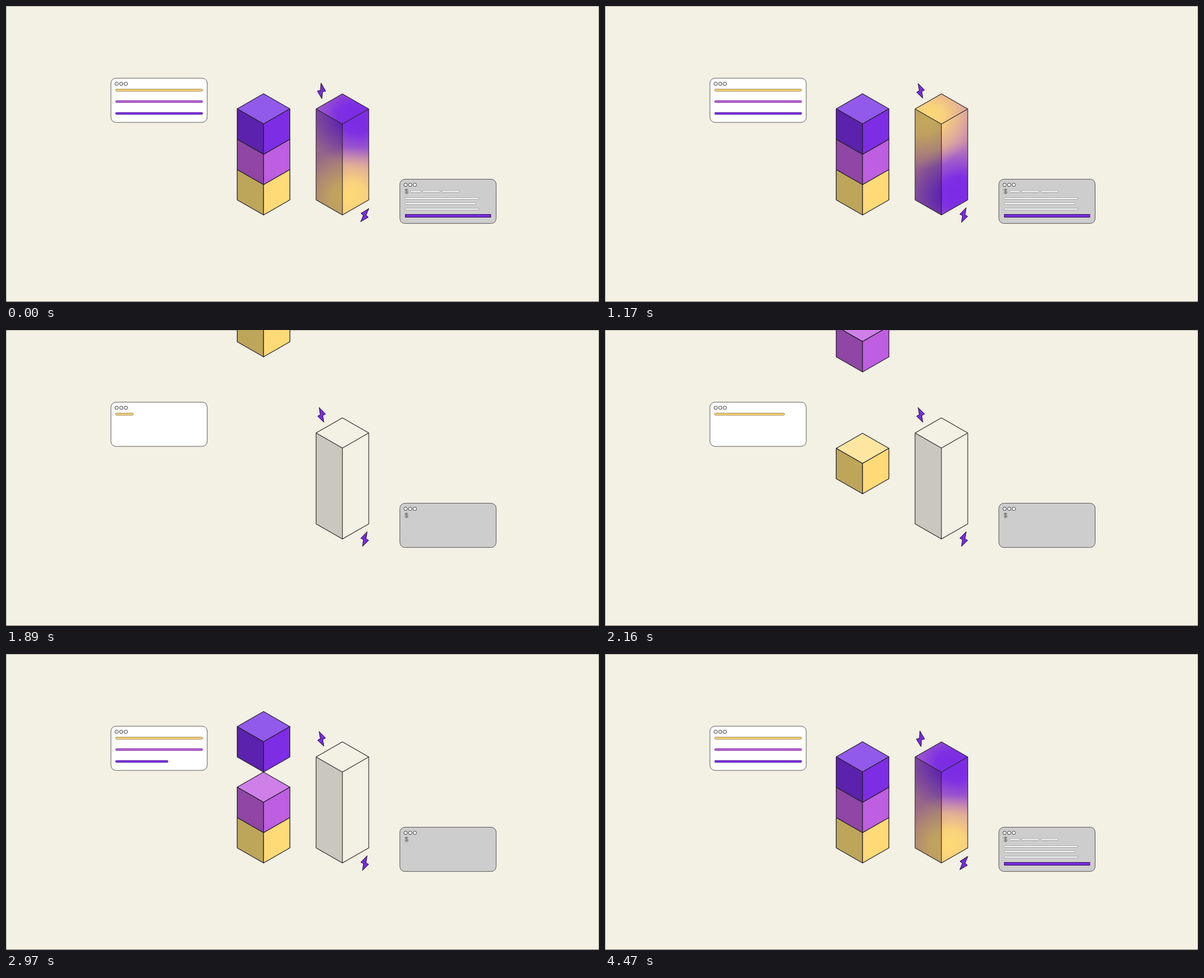
Recreate the animation shown at these times as an HTML page. Size 1058 by 529 pixels, loop 4500 ms.

```html
<!DOCTYPE html>
<html lang="en">
<head>
<meta charset="utf-8">
<title>Stacking blocks</title>
<style>
html, body { margin: 0; width: 100%; height: 100%; overflow: hidden; background: #f3f0e4; }
svg { display: block; width: 100vw; height: 100vh; }
</style>
</head>
<body>
<svg id="stage" viewBox="0 0 1058 529">
  <defs>
    <radialGradient id="glowPurple">
      <stop offset="0" stop-color="#7a2be5"/>
      <stop offset=".3" stop-color="#7a2be5" stop-opacity=".95"/>
      <stop offset=".65" stop-color="#7d30e2" stop-opacity=".5"/>
      <stop offset="1" stop-color="#8a40dc" stop-opacity="0"/>
    </radialGradient>
    <radialGradient id="glowYellow">
      <stop offset="0" stop-color="#ffda76"/>
      <stop offset=".3" stop-color="#ffda76" stop-opacity=".9"/>
      <stop offset=".65" stop-color="#fcd47c" stop-opacity=".5"/>
      <stop offset="1" stop-color="#f0c090" stop-opacity="0"/>
    </radialGradient>
    <clipPath id="prismClip"><path d="M600.2 157l47 27v162.500l-47 27l-47-27v-162.500z"/></clipPath>
  </defs>
  <rect width="1058" height="529" fill="#f3f0e4"/>
  <rect width="1058" height="528.500" fill="none" stroke="#55544f" stroke-width=".9"/>
</svg>
<script>
const LOOP = 4500, FALL_START = 1800, STEP = 450, TRAVEL = 408;
const stage = document.getElementById('stage');

function add(parent, tag, attrs = {}) {
  const el = document.createElementNS('http://www.w3.org/2000/svg', tag);
  for (const key in attrs) el.setAttribute(key, attrs[key]);
  parent.appendChild(el);
  return el;
}
const progress = (t, from, to) => Math.min(1, Math.max(0, (t - from) / (to - from)));

// Piecewise linear value over [time, value] pairs.
function track(keys, t) {
  let i = 1;
  while (i < keys.length - 1 && t > keys[i][0]) i++;
  const [t0, v0] = keys[i - 1], [t1, v1] = keys[i];
  return v0 + (v1 - v0) * progress(t, t0, t1);
}

function panel(x, y, fill) {
  add(stage, 'rect', { x, y, width: 171.8, height: 79, rx: 9, fill, stroke: '#333', 'stroke-width': .8 });
  for (let i = 0; i < 3; i++)
    add(stage, 'circle', { cx: x + 10.3 + i * 8.2, cy: y + 10, r: 3, fill: '#fff', stroke: '#222', 'stroke-width': .9 });
}

function bar(parent, x, cy, length, height, style) {
  const el = add(parent, 'rect', { x, y: cy - height / 2, height, 'stroke-width': .8, ...style });
  return { el, length };
}
function setBar({ el, length }, p) {
  el.setAttribute('width', length * p);
  el.setAttribute('visibility', p > 0 ? 'visible' : 'hidden');
}

// Editor panel
panel(187.2, 129, '#fff');
const editor = add(stage, 'g');
const codeBars = [['#fdd67a', '#7d6a35', 150.4], ['#be5ee0', '#6b2f80', 170.8], ['#7a2be5', '#42157f', 192]]
  .map(([fill, stroke, y]) => bar(editor, 195.6, y, 155.4, 3.6, { rx: 1.8, fill, stroke }));

// Terminal panel
panel(702.7, 309.6, '#cdcdcd');
add(stage, 'text', {
  x: 711.6, y: 335.4, 'font-size': 11, 'font-family': "'Liberation Sans', Arial, sans-serif",
  fill: '#fff', stroke: '#555', 'stroke-width': .6
}).textContent = '$';
const terminal = add(stage, 'g');
const outputBars = [[722, 331.3, 18], [743.3, 331.3, 31], [778, 331.3, 30.6],
  [712.2, 344, 131.6], [712.2, 353, 126.4], [712.2, 363, 131.6]]
  .map(([x, y, w]) => bar(terminal, x, y, w, 2.9, { rx: .8, fill: '#fff', stroke: '#777', 'stroke-width': .6 }));
const loadBar = bar(terminal, 712.5, 375, 152.4, 5, { fill: '#7a2be0', stroke: '#2b1250', 'stroke-width': 1 });

// Cubes, bottom one first
function cube(y, top, left, right) {
  const g = add(stage, 'g', { stroke: '#2a2030', 'stroke-width': 1.3, 'stroke-linejoin': 'round' });
  const face = (d, fill) => add(g, 'path', { d: `M459.500 ${y + 54}${d}z`, fill });
  face('l-47-27l47-27l47 27', top);
  face('l-47-27v54.300l47 27', left);
  face('l47-27v54.300l-47 27', right);
  return g;
}
const cubes = [
  cube(265.2, '#ffe6a0', '#bda65a', '#ffda76'),
  cube(211, '#cf80e8', '#8f46a5', '#be5ee0'),
  cube(156.8, '#925aeb', '#5b22ad', '#7d2de4')
];

// Prism
const LEFT_FACE = 'M553.200 184l47 27v162.500l-47-27z';
const prism = add(stage, 'g', { 'clip-path': 'url(#prismClip)' });
add(prism, 'rect', { x: 550, y: 150, width: 100, height: 230, fill: '#c385b4' });
const purpleGlow = add(prism, 'ellipse', { fill: 'url(#glowPurple)' });
const yellowGlow = add(prism, 'ellipse', { fill: 'url(#glowYellow)' });
add(prism, 'path', { d: LEFT_FACE, fill: '#000', opacity: .08 });
add(stage, 'path', { d: LEFT_FACE, fill: '#000', opacity: .17 });
add(stage, 'path', {
  d: 'M600.200 157l47 27v162.500l-47 27l-47-27v-162.500zM553.200 184l47 27l47-27M600.200 211v162.500',
  fill: 'none', stroke: '#2a2528', 'stroke-width': 1.1, 'stroke-linejoin': 'round'
});

function placeGlow(el, degrees, side) {
  const a = degrees * Math.PI / 180;
  const dx = -side * 52 * Math.sin(a), dy = side * 75 * Math.cos(a);
  el.setAttribute('rx', 108);
  el.setAttribute('ry', 1.2 * Math.hypot(dx, dy));
  el.setAttribute('transform', `translate(${600.2 + dx} ${268 + dy}) rotate(${degrees})`);
}
const YELLOW_TURN = [[3150, -28], [3690, -22], [4500, -13], [5070, 82], [6300, 220]];
const PURPLE_TURN = [[3150, 0], [3690, 8], [4500, 26], [5070, 96], [6300, 205]];

// Bolts
const bolts = [[563, 151.7, 1], [640, 373.6, -1]].map(([x, y, flip]) => {
  const el = add(stage, 'path', {
    d: [[-4.3, -13.2], [7, -1.5], [2.2, 1.1], [4, 13.2], [-7, 2.3], [-2.3, -.4]]
      .map(([px, py], i) => `${i ? 'L' : 'M'}${px * flip} ${py}`).join('') + 'z',
    fill: '#7a2be0', stroke: '#1d1033', 'stroke-width': 1, 'stroke-linejoin': 'round'
  });
  return { el, x, y };
});

function render(t) {
  const clearing = t < FALL_START;
  const fade = clearing ? 1 - progress(t, 1470, FALL_START) : 1;
  const barFade = clearing ? 1 - progress(t, 1380, 1700) : 1;

  cubes.forEach((g, i) => {
    const land = FALL_START + STEP * (i + 1);
    const lift = clearing ? 0 : TRAVEL * (1 - progress(t, FALL_START, land));
    g.setAttribute('transform', `translate(0 ${-lift})`);
    g.setAttribute('opacity', fade);
    setBar(codeBars[i], clearing ? 1 : progress(t, land - STEP, land));
  });
  editor.setAttribute('opacity', barFade);
  terminal.setAttribute('opacity', barFade);
  outputBars.forEach((b, i) => {
    const start = 3150 + i * 90;
    setBar(b, clearing ? 1 : progress(t, start, start + 90));
  });
  setBar(loadBar, clearing ? 1 : progress(t, 3690, 4140));

  const turnTime = t < 2000 ? t + LOOP : t;
  placeGlow(yellowGlow, track(YELLOW_TURN, turnTime), 1);
  placeGlow(purpleGlow, track(PURPLE_TURN, turnTime), -1);
  prism.setAttribute('opacity', clearing ? fade : progress(t, 3230, 3785));

  const swing = 14.5 * Math.sin(2 * Math.PI * progress(turnTime, 4320, 5104));
  for (const { el, x, y } of bolts)
    el.setAttribute('transform', `translate(${x} ${y}) rotate(${swing})`);
}

const begin = performance.now();
function tick() {
  render((performance.now() - begin) % LOOP);
  requestAnimationFrame(tick);
}
tick();
</script>
</body>
</html>
```
